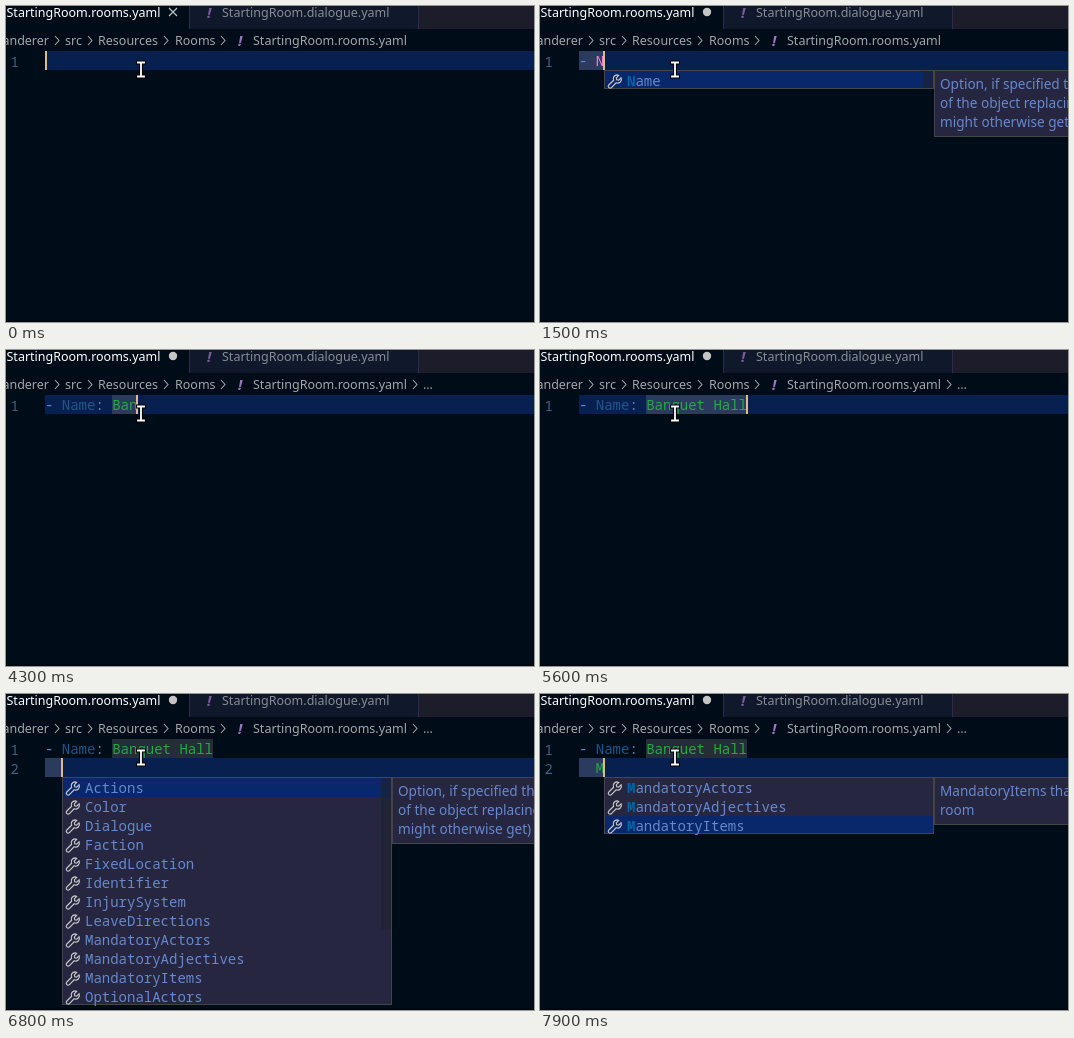
Recreate the animation shown at these times as an HTML page with a canvas. Size 528 by 316 pixels, loop 8 s.

```html
<!DOCTYPE html>
<html>
<head>
<meta charset="utf-8">
<style>
html, body { margin: 0; height: 100%; overflow: hidden; background: #000c18; }
canvas { display: block; }
</style>
</head>
<body>
<canvas id="stage" width="528" height="316"></canvas>
<script>
const ctx = document.getElementById('stage').getContext('2d');
const LOOP = 8000, STEP = 100, ROW = 19, CHAR = 8.4, LEFT = 39, TOP = 45;
const MONO = '14px "Noto Sans Mono", "DejaVu Sans Mono", monospace';
const UI = '12.5px "Noto Sans", "Open Sans", sans-serif';
const DOC = '13.6px "Noto Sans", "Open Sans", sans-serif';
const C = {
  bg: '#000c18', line: '#082050', widget: '#262641', border: '#454545', picked: '#08286b',
  text: '#6688cc', match: '#0063a5', key: '#225588', string: '#22aa44', constant: '#f280d0',
  number: '#406385', cursor: '#ddbb88', crumb: '#a3a7ab', icon: '#c5c5c5', stop: 'rgba(124,124,124,.3)'
};
const KEYS = ['Actions', 'Color', 'Dialogue', 'Faction', 'FixedLocation', 'Identifier', 'InjurySystem',
  'LeaveDirections', 'MandatoryActors', 'MandatoryAdjectives', 'MandatoryItems', 'Name', 'OptionalActors'];
const OPTION_DOC = ['Option, if specified the name', 'of the object replacing what it', 'might otherwise get)'];
const ROOM_NAME = 'Banquet Hall';
const TYPED_AT = [4000, 4200, 4300, 4500, 4600, 4700, 4900, 5000, 5200, 5400, 5500, 5600];
const CURSOR_OFF = [[900, 1400], [2000, 2500], [3000, 3500], [6900, 7300]];
const WRENCH = new Path2D('M10 1.5a4 4 0 0 0-3.6 5.6l-5 5a1.9 1.9 0 0 0 2.7 2.7l5-5a4 4 0 0 0 5.2-5.3l-2.6 2.5-2-.4-.4-2 2.5-2.6a4 4 0 0 0-1.8-.5z');
const IBEAM = new Path2D('M132 56.5h6M135 57v13M132 70.5h6');

const within = (t, a, b) => t >= a && t < b;
const column = c => Math.max(39, Math.floor(38.5 + CHAR * c));

function rect(x, y, w, h, color) {
  ctx.fillStyle = color;
  ctx.fillRect(x, y, w, h);
}

function text(str, x, y, font, color) {
  ctx.font = font;
  ctx.fillStyle = color;
  ctx.fillText(str, x, y);
}

function stroke(path, color, width) {
  ctx.strokeStyle = color;
  ctx.lineWidth = width;
  ctx.stroke(path);
}

function box(x, y, w, h) {
  rect(x, y, w, h, C.border);
  rect(x + 1, y + 1, w - 2, h - 2, C.widget);
}

function yamlMark(x, y, color) {
  text('!', x, y, 'italic bold 15px "Noto Sans", sans-serif', color);
}

function drawTabs(dirty) {
  rect(0, 0, 528, 23, '#1c1c2a');
  rect(0, 0, 183, 23, C.bg);
  rect(184, 0, 228, 23, '#10192c');
  rect(183, 0, 1, 23, '#2b2b4a');
  rect(412, 0, 1, 23, '#2b2b4a');
  text('StartingRoom.rooms.yaml', 0.5, 11, UI, '#fff');
  yamlMark(201, 12, '#7d5b9c');
  text('StartingRoom.dialogue.yaml', 216, 11, UI, '#878c95');
  if (dirty) {
    ctx.beginPath();
    ctx.arc(167, 6, 4.2, 0, 7);
    ctx.fillStyle = C.icon;
    ctx.fill();
  } else {
    stroke(new Path2D('M163 2l8 8m0-8l-8 8'), C.icon, 1.1);
  }
}

function drawCrumbs(tail) {
  const chevron = x => stroke(new Path2D(`M${x - 2} 30l4 4.5-4 4.5`), C.crumb, 1.1);
  const crumb = (str, x) => text(str, x, 39, UI, C.crumb);
  ctx.textAlign = 'right';
  crumb('Wanderer', 43);
  ctx.textAlign = 'left';
  [51, 84, 160, 217].forEach(chevron);
  crumb('src', 59);
  crumb('Resources', 92);
  crumb('Rooms', 169);
  yamlMark(232, 40, '#a074c4');
  crumb('StartingRoom.rooms.yaml', 247);
  if (tail) chevron(409);
  if (tail === 'more') crumb('…', 417);
  if (tail === 'path') {
    stroke(new Path2D('M423 29.5h-4.5v9h4.5M427 29.5h4.5v9h-4.5M421 34h8M425 31v6M423 32l-2 2 2 2M427 32l2 2-2 2'), C.icon, 1.4);
    crumb('0', 439);
    chevron(454);
    stroke(new Path2D('M463.5 29.5h13v9h-13z'), C.icon, 1);
    text('abc', 465, 36.5, 'bold 6px "Noto Sans", sans-serif', C.icon);
    crumb('Name', 485);
  }
}

// parts: [string, colour] pairs laid out on the character grid
function drawLine(row, parts) {
  let col = 0;
  for (const [str, color] of parts) {
    text(str, LEFT + col * CHAR, TOP + row * ROW + 15, MONO, color);
    col += str.length;
  }
}

function drawPopup({ col, row, items, prefix = '', picked = 0, doc, bar, thumb }) {
  const x = column(col) + 1, y = TOP + (row + 1) * ROW, bottom = y + items.length * ROW;
  box(x, y, 330, bottom - y);
  items.forEach((name, i) => {
    const top = y + 1 + i * ROW, base = top + 14.5;
    if (i === picked) rect(x + 1, top, 328, Math.min(ROW, bottom - 1 - top), C.picked);
    ctx.save();
    ctx.translate(x + 3.5, top + 2.5);
    ctx.scale(0.95, 0.95);
    stroke(WRENCH, C.icon, 1.25);
    ctx.restore();
    text(prefix, x + 23, base, 'bold ' + MONO, C.match);
    text(name.slice(prefix.length), x + 23 + prefix.length * CHAR, base, MONO, C.text);
  });
  if (bar > 0) {
    ctx.globalAlpha = bar;
    rect(x + 319, y + 1, 10, thumb, '#1f2230aa');
    ctx.globalAlpha = 1;
  }
  box(x + 330, y, 200, doc.length * ROW + 10);
  doc.forEach((str, i) => text(str, x + 336, y + 19 + i * ROW, DOC, C.text));
}

function popupAt(t) {
  if (within(t, 900, 1500))
    return { col: 2, row: 0, items: KEYS.slice(0, 12), doc: OPTION_DOC, bar: t >= 1000 ? 1 : 0, thumb: 152 };
  if (within(t, 1500, 2600))
    return { col: 3, row: 0, items: ['Name'], prefix: 'N', doc: OPTION_DOC, bar: 1 - (t - 1500) / 600, thumb: 17 };
  if (within(t, 6800, 7400))
    return { col: 2, row: 1, items: KEYS.filter(k => k !== 'Name'), doc: OPTION_DOC, bar: 1, thumb: 152 };
  if (t >= 7400) {
    const items = KEYS.filter(k => k[0] === 'M');
    const picked = t >= 7900 ? 2 : t >= 7700 ? 1 : 0;
    return { col: 3, row: 1, items, prefix: 'M', picked, doc: [items[picked] + ' that', 'room'],
      bar: 1 - (t - 7400) / 500, thumb: 55 };
  }
}

function draw(t) {
  const accepted = t >= 2600, selected = within(t, 2600, 3500), row = t >= 5800 ? 1 : 0;
  const name = ROOM_NAME.slice(0, TYPED_AT.filter(at => t >= at).length);
  const value = selected ? 'null' : name;
  const dash = t >= 400 ? '- ' : t >= 200 ? '-' : '';
  const first = accepted
    ? [['- ', C.text], ['Name', C.key], [': ', C.text], [value, selected ? C.constant : C.string]]
    : [[dash, C.text], [t >= 1500 ? 'N' : '', C.constant]];
  const indent = t >= 6400 ? '  ' : t >= 6100 ? ' ' : '';
  const second = [[indent, C.text], [t >= 7400 ? 'M' : '', C.string]];
  const length = parts => parts.reduce((n, [str]) => n + str.length, 0);
  const end = length(row ? second : first);

  rect(0, 0, 528, 316, C.bg);
  rect(0, 314, 528, 2, '#00070f');
  drawTabs(t >= 200);
  drawCrumbs(within(t, 2900, 3800) ? 'path' : t >= 1800 ? 'more' : '');

  if (!selected) rect(39, TOP + row * ROW, 489, ROW, C.line);
  const mark = (r, from, to, color) => {
    const x = Math.round(LEFT + from * CHAR);
    rect(x, TOP + r * ROW, Math.round(LEFT + to * CHAR) - x, ROW, color);
  };
  if (selected) mark(0, 8, 12, '#770811');
  mark(0, accepted ? 8 : 0, length(first), C.stop);
  if (row) mark(1, 0, end, C.stop);

  text('1', 4.5, TOP + 16, MONO, C.number);
  drawLine(0, first);
  if (row) {
    text('2', 4.5, TOP + ROW + 16, MONO, C.number);
    drawLine(1, second);
  }
  if (!CURSOR_OFF.some(([a, b]) => within(t, a, b)))
    rect(column(end), TOP + row * ROW, 2, ROW, C.cursor);

  const popup = popupAt(t);
  if (popup) drawPopup(popup);

  ctx.lineCap = 'square';
  stroke(IBEAM, '#000', 4);
  stroke(IBEAM, '#fff', 1.8);
  ctx.lineCap = 'butt';
}

const start = performance.now();
function frame() {
  const t = (performance.now() - start) % LOOP;
  draw(Math.floor(t / STEP) * STEP);
  requestAnimationFrame(frame);
}
frame();
</script>
</body>
</html>
```
